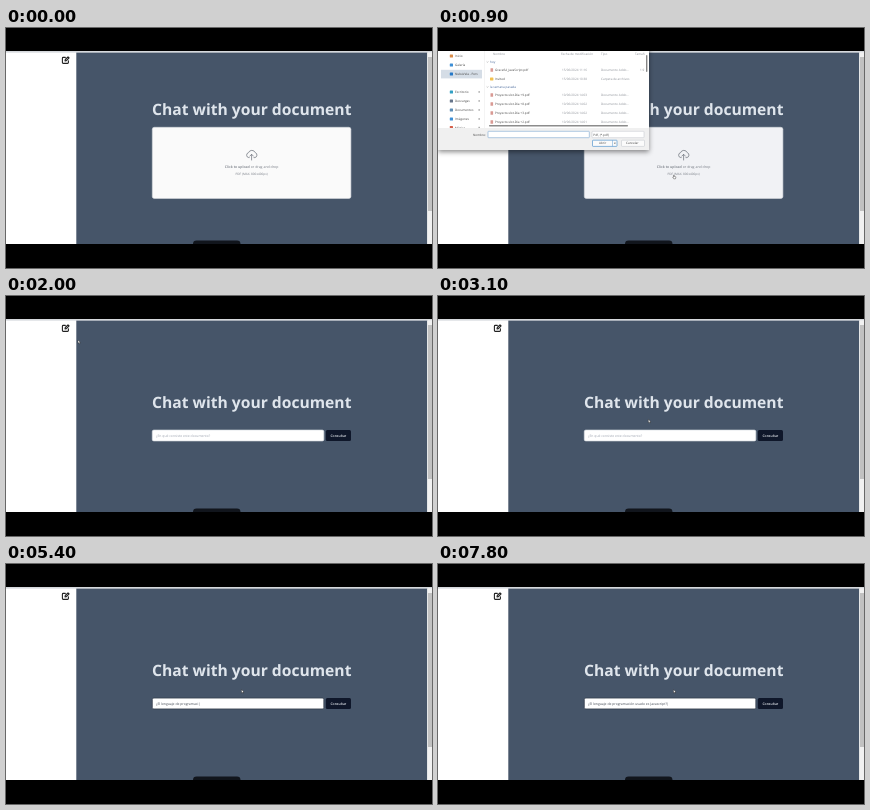
Write an HTML page that moves like this. It is 426 px wide and 240 px high and loops after 8 s.

```html
<!DOCTYPE html>
<html lang="en">
<head>
<meta charset="utf-8">
<title>Chat with your document</title>
<style>
  html, body { margin: 0; width: 100%; height: 100%; overflow: hidden; background: #000; }
  svg { display: block; width: 426px; height: 240px; }
  text { font-family: "Open Sans", "Noto Sans", sans-serif; font-size: 3.1px; fill: #444;
         text-rendering: geometricPrecision; white-space: pre; }
  .title { font-size: 15.65px; font-weight: 700; fill: #dfe5ec; }
  .soft { fill: #8b8f96; }
  .hint { font-size: 3.5px; fill: #777c85; text-anchor: middle; }
  .field { font-size: 3.4px; }
</style>
</head>
<body>
<svg viewBox="0 0 426 240">
  <defs>
    <clipPath id="screen"><rect y="23" width="426" height="193"/></clipPath>
    <clipPath id="side"><rect y="23" width="44" height="77"/></clipPath>
    <clipPath id="list"><rect x="48" y="23" width="159" height="73.5"/></clipPath>
    <filter id="shadow" x="-10%" y="-10%" width="120%" height="130%">
      <feDropShadow dx="0" dy="2" stdDeviation="2.5" flood-opacity=".45"/>
    </filter>
  </defs>
  <g clip-path="url(#screen)">
    <rect y="23" width="426" height="193" fill="#fff"/>
    <rect y="23" width="426" height="1.6" fill="#d5d8dc"/>
    <rect x="70.3" y="24.6" width="351" height="192" fill="#465569"/>
    <rect x="421.3" y="24.6" width="5" height="192" fill="#f1f1f1"/>
    <rect x="422" y="29" width="4" height="154" fill="#c1c1c1"/>
    <g fill="none" stroke="#222" stroke-width="1.1" stroke-linecap="round" stroke-linejoin="round">
      <path d="M59.3 29.4H57.2Q56.4 29.4 56.4 30.2V34.6Q56.4 35.4 57.2 35.4H61.6Q62.4 35.4 62.4 34.6V32.7"/>
      <path d="M59 32.9L59.3 31.5L62 28.8L63.1 29.9L60.4 32.6Z"/>
    </g>
    <rect x="187" y="212.6" width="47.5" height="10" rx="3.5" fill="#11151c"/>
    <text id="title" class="title" x="146">Chat with your document</text>

    <g id="upload">
      <rect id="card" x="146.3" y="99.3" width="198.6" height="71.2" rx="2" stroke="#d6d9de" stroke-width=".6"/>
      <path d="M243.2 129.6H242.8A2.5 2.5 0 0 1 242.5 124.7A3.6 3.6 0 0 1 249.2 124.6A2.6 2.6 0 0 1 248.9 129.6H248M245.6 132V126.4M243.8 128.1L245.6 126.3L247.4 128.1"
        fill="none" stroke="#777c85" stroke-width=".8" stroke-linecap="round" stroke-linejoin="round"/>
      <text class="hint" x="245.6" y="140.2"><tspan font-weight="600">Click to upload</tspan> or drag and drop</text>
      <text class="hint" x="245.6" y="147.2" style="font-size:3.1px">PDF (MAX. 800x400px)</text>
    </g>

    <g id="ask">
      <rect id="box" x="146.3" y="134.1" width="171.5" height="10.8" rx="1.5" fill="#fff" stroke-width=".7"/>
      <text id="query" class="field" x="150" y="140.9"></text>
      <rect x="319.8" y="134" width="25.2" height="11" rx="1.5" fill="#0f172a"/>
      <text class="field" x="332.4" y="140.9" text-anchor="middle" font-weight="600" style="fill:#e8ecf2">Consultar</text>
    </g>

    <g id="dialog"></g>
    <g id="cursor" stroke="#222" stroke-width=".5" fill="#fff" stroke-linejoin="round">
      <path id="arrow" d="M0 0V4.2L1 3.3L1.7 4.8L2.4 4.5L1.8 3.1H3.1Z"/>
      <path id="hand" d="M0 .3Q.5 -.3 .9 .3V1.8L2.8 2.2Q3.2 3.6 2.4 4.8H.4L-1 2.8L0 2.7Z"/>
    </g>
  </g>
</svg>
<script>
const LOOP = 8000, STEP = 100;
const $ = id => document.getElementById(id);
const rect = (x, y, w, h, fill, more = '') =>
  `<rect x="${x}" y="${y}" width="${w}" height="${h}" fill="${fill}" ${more}/>`;
const label = (x, y, s, cls = '', id = '') => `<text x="${x}" y="${y}" class="${cls}" id="${id}">${s}</text>`;
const show = (id, on) => { $(id).style.display = on ? '' : 'none'; };

const FILE = 'Graceful_JavaScript.pdf';

function buildDialog() {
  const places = [
    [28, 'Inicio', '#d98c4a'], [37, 'Galería', '#3d8fd6'], [46, 'NubeVela - Pers', '#2679c8'],
    [64, 'Escritorio', '#32a0c4'], [73, 'Descargas', '#66758a'], [82, 'Documentos', '#5d8db5'],
    [91, 'Imágenes', '#3d8fd6'], [99.6, 'Música', '#d5604c']
  ];
  const rows = [
    [42, FILE, '15/06/2024 11:16', 'Documento Adob...', '1.9'],
    [51, 'Invited', '15/06/2024 10:38', 'Carpeta de archivos', ''],
    [67, 'Proyecto-slot-Dia +9.pdf', '10/06/2024 14:03', 'Documento Adob...', ''],
    [76, 'Proyecto-slot-Dia +8.pdf', '10/06/2024 14:02', 'Documento Adob...', ''],
    [85, 'Proyecto-slot-Dia +3.pdf', '10/06/2024 14:02', 'Documento Adob...', ''],
    [94, 'Proyecto-slot-Dia +2.pdf', '10/06/2024 14:01', 'Documento Adob...', '']
  ];
  const side = places.map(([y, s, c], i) =>
    rect(11.8, y - 1.6, 3.2, 3, c, 'rx=".5"') + label(17, y + 1.1, s) +
    (i > 2 ? rect(40.5, y - .8, 1.3, 1.5, '#999') : '')).join('');
  const list = rows.map(([y, name, date, type, size], i) =>
    (i === 1 ? rect(52, y - 1.4, 3.4, 2.8, '#f2c14e', 'rx=".4"')
             : rect(52.5, y - 1.8, 2.6, 3.5, '#d99a94', 'rx=".3"')) +
    label(57, y + 1.1, name) + label(124, y + 1.1, date, 'soft') +
    label(163, y + 1.1, type, 'soft') + label(202, y + 1.1, size, 'soft')).join('');
  const heads = [[55, 'Nombre'], [123, 'Fecha de modificación'], [163, 'Tipo'], [197, 'Tamaño']]
    .map(([x, s]) => label(x, 27.1, s, 'soft')).join('');
  const groups = [[34, 'hoy'], [59, 'la semana pasada']].map(([y, s]) =>
    `<path d="M48.7 ${y - .5}l.8 .8l.8 -.8" fill="none" stroke="#666" stroke-width=".4"/>` +
    label(52, y + 1, s).replace('<text', '<text style="fill:#47689a"')).join('');
  const edge = 'stroke="#bfc3c8" stroke-width=".5" rx=".6"';
  $('dialog').innerHTML =
    rect(0, 15, 211, 107, '#fff', 'filter="url(#shadow)"') +
    rect(0, 100, 211, 22, '#f0f0f0') +
    `<g clip-path="url(#side)">${rect(3, 41.8, 41, 8.6, '#d5dde6')}${side}</g>` +
    rect(46.3, 23, .4, 77, '#e2e2e2') +
    `<g clip-path="url(#list)">${rect(48, 38, 159, 8.6, '#cce4f8', 'id="picked"')}${heads}${groups}${list}</g>` +
    rect(208, 27, 1.4, 17, '#858585', 'rx=".7"') +
    rect(51, 97.1, 139, 1.3, '#8c8c8c', 'rx=".6"') +
    label(35, 107.6, 'Nombre:') +
    rect(50, 103.3, 101.3, 6.4, '#fff', 'stroke="#7ba7d0" stroke-width=".6" rx=".6"') +
    label(51, 107.6, FILE, '', 'fileName') +
    rect(154, 103.3, 52, 6.4, '#fff', edge) + label(155.3, 107.6, 'Pdf, (*.pdf)') +
    rect(154.5, 112.2, 24.5, 6.2, '#fbfbfb', 'stroke="#3b86c8" stroke-width=".6" rx=".6"') +
    rect(174.6, 112.4, .4, 5.8, '#3b86c8') +
    '<path d="M176 114.8h1.8l-.9 1.2Z" fill="#444"/>' + label(161, 116.4, 'Abrir') +
    rect(183.5, 112.2, 23, 6.2, '#fbfbfb', edge) + label(188, 116.4, 'Cancelar');
}

// Pointer: [time, x, y]
const PATH = [
  [300, 282, 212], [600, 235.5, 147], [1000, 235.5, 147], [1500, 72, 44],
  [2500, 72, 44], [3300, 236, 138], [3500, 236, 138], [3700, 235.5, 125.5]
];
// Typing: [time, characters]
const TYPED = [
  [3600, 0], [3700, 1], [3900, 3], [4300, 3], [5200, 21], [5400, 26], [5500, 26],
  [5900, 31], [6200, 31], [6500, 36], [6600, 36], [7100, 43], [7200, 43], [7800, 49]
];
const QUESTION = '¿El lenguaje de programación usado es Javascript?';
const PROMPT = '¿En qué consiste este documento?';

const smooth = k => k * k * (3 - 2 * k);
function track(keys, t, col, ease = k => k) {
  const i = keys.findIndex(k => k[0] > t);
  if (i === 0) return keys[0][col];
  if (i < 0) return keys[keys.length - 1][col];
  const a = keys[i - 1], b = keys[i];
  return a[col] + (b[col] - a[col]) * ease((t - a[0]) / (b[0] - a[0]));
}

function draw(t) {
  const asking = t >= 2000, focused = t >= 3400, over = t >= 500 && !asking;
  const picked = t >= 1600;
  show('upload', !asking);
  show('ask', asking);
  show('dialog', t >= 700 && !asking);
  show('picked', picked);
  show('fileName', picked);
  $('title').setAttribute('y', asking ? 112.3 : 86.8);
  $('card').setAttribute('fill', over ? '#f1f2f5' : '#fafafa');
  $('box').setAttribute('stroke', focused ? '#2b3544' : '#dfe3e8');

  const n = Math.floor(track(TYPED, t, 1) + 1e-6);
  const caret = focused && !(t >= 6100 && t < 6300);
  $('query').textContent = n ? QUESTION.slice(0, n) + (caret ? '|' : '') : PROMPT;
  $('query').style.fill = n ? '#3f4650' : '#9ca3af';

  const x = track(PATH, t, 1, smooth), y = track(PATH, t, 2, smooth);
  const hand = over && t < 1100;
  $('cursor').setAttribute('transform', `translate(${x} ${y}) scale(.8)`);
  show('cursor', t >= 300);
  show('hand', hand);
  show('arrow', !hand);
}

buildDialog();
draw(0);
const start = performance.now();
function tick() {
  const t = (performance.now() - start) % LOOP;
  draw(Math.floor(t / STEP) * STEP);
  requestAnimationFrame(tick);
}
requestAnimationFrame(tick);
</script>
</body>
</html>
```
